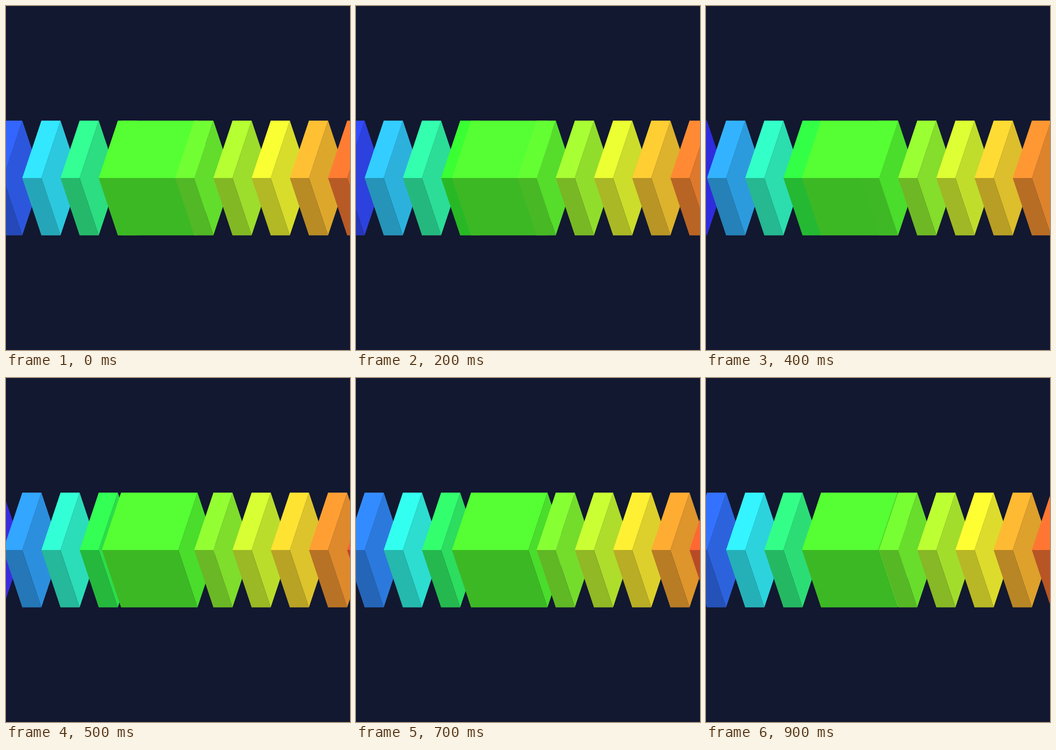
These frames come from a looping animation (748 px wide and 748 px high, 1000 ms). An HTML page with a canvas:

```html
<!DOCTYPE html>
<html lang="en">
<head>
<meta charset="utf-8">
<title>Rainbow slabs</title>
<style>
html, body { margin: 0; width: 100%; height: 100%; overflow: hidden; background: #12182f; }
canvas { display: block; width: 748px; height: 748px; }
</style>
</head>
<body>
<canvas id="stage" width="748" height="748"></canvas>
<script>
const SIZE = 748;
const GAP = SIZE / 9;
const HALF = SIZE / 18;
const TOP = SIZE / 3, MID = SIZE / 2, LOW = SIZE * 2 / 3;
const BLOCK_X = 208.6, BLOCK_W = GAP * 2, BLOCK_HUE = 110;
const EXIT_X = BLOCK_X + BLOCK_W - HALF;
const START_X = 35.4;
const LOOP = 1000, STEPS = 10;

const ctx = document.getElementById("stage").getContext("2d");

function shade(hue, value) {
  const channel = n => {
    const k = (n + hue / 60) % 6;
    const dip = Math.max(0, Math.min(k, 4 - k, 1));
    return Math.round(255 * value * (1 - 0.8 * dip));
  };
  return `rgb(${channel(5)},${channel(3)},${channel(1)})`;
}

function face(color, ...points) {
  ctx.fillStyle = color;
  ctx.beginPath();
  for (const [x, y] of points) ctx.lineTo(x, y);
  ctx.closePath();
  ctx.fill();
}

function box(x, width, hue) {
  const right = x + width;
  face(shade(hue, 0.865), [right, MID], [right + HALF, TOP], [right + 2 * HALF, MID], [right + HALF, LOW]);
  face(shade(hue, 0.72), [x, MID], [right, MID], [right + HALF, LOW], [x + HALF, LOW]);
  face(shade(hue, 1), [x, MID], [x + HALF, TOP], [right + HALF, TOP], [right, MID]);
}

// The hue changes about twice as fast before the block as after it.
function hueAt(x) {
  return x < BLOCK_X
    ? BLOCK_HUE + Math.max(0, 203 - x) * 0.46
    : BLOCK_HUE - (x - EXIT_X) * 20 / GAP;
}

function draw(time) {
  const step = Math.floor((time % LOOP) / LOOP * STEPS);
  const first = START_X - GAP * step / STEPS;
  ctx.fillStyle = "#12182f";
  ctx.fillRect(0, 0, SIZE, SIZE);

  const slabs = Array.from({ length: 11 }, (_, i) => first + (i - 1) * GAP);
  const slab = x => box(x, HALF, hueAt(x));
  slabs.filter(x => x < BLOCK_X).forEach(slab);
  box(BLOCK_X, BLOCK_W, BLOCK_HUE);
  slabs.filter(x => x > EXIT_X).forEach(slab);
}

const start = performance.now();
function tick() {
  draw(performance.now() - start);
  requestAnimationFrame(tick);
}
tick();
</script>
</body>
</html>
```
